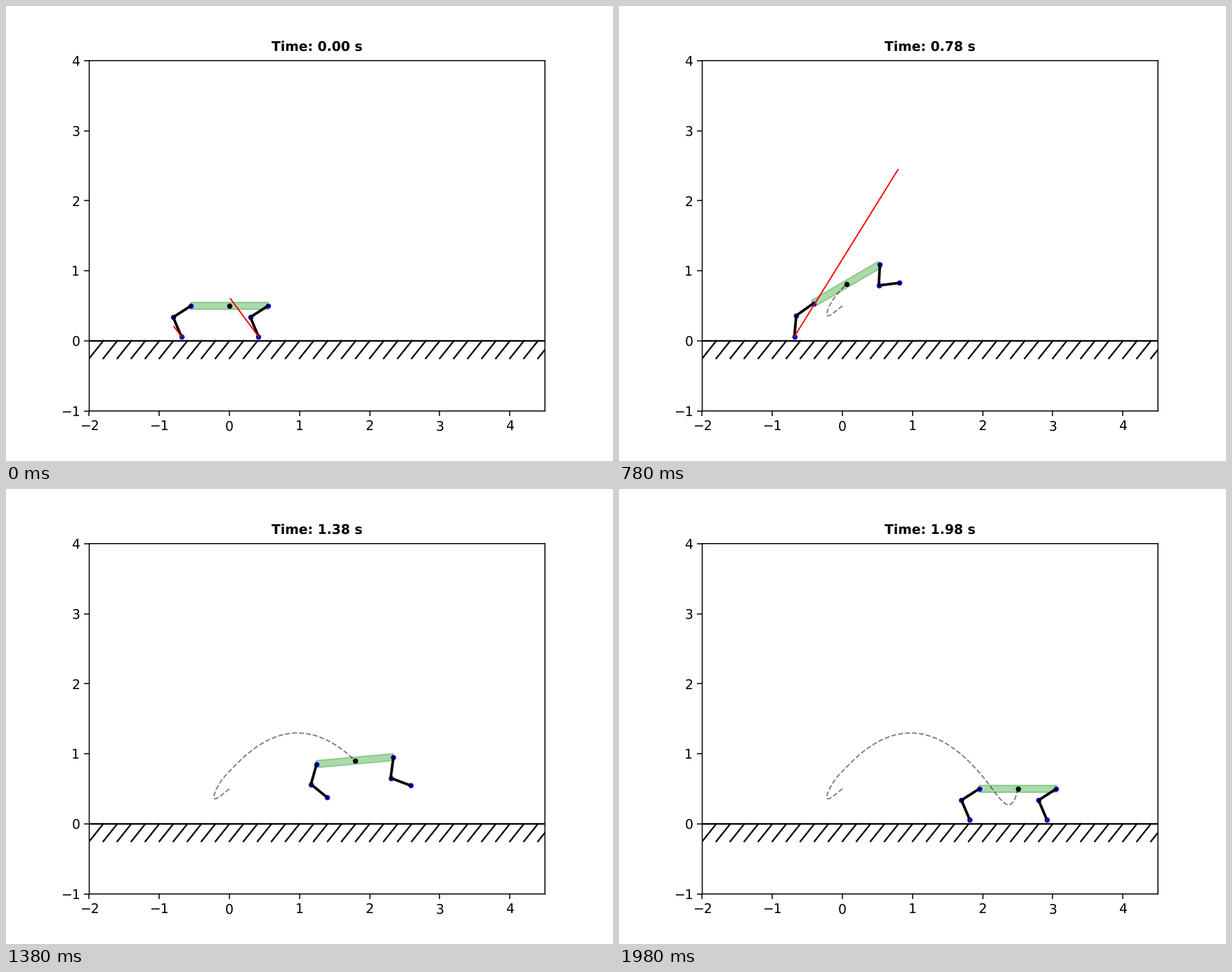
These frames come from a looping animation (864x648 px, 2 s). A matplotlib script:

```python
import numpy as np
import matplotlib.pyplot as plt
from matplotlib.animation import FuncAnimation
from matplotlib.patches import Polygon
from numpy.polynomial.polynomial import polyder, polyval

plt.rcParams.update({"path.snap": False, "text.hinting": "none"})

FRAMES, STEP = 100, 20          # 2 s loop
FRONT_OFF, HIND_OFF, LAND, REST = 0.6, 0.8, 1.5, 1.98
LINK, HALF, THICK = 0.3, 0.55, 0.1
G, WEIGHT = 9.81, 1.08          # weight in drawn force units
FALL = np.array([0, -G, 0])
JUMP = np.array([2.5, 0])


def blend(t0, t1, start, a0, end, a1):
    """Quintic from (pos, vel) and acceleration a0 to the same at t1."""
    T = t1 - t0
    (p0, v0), (p1, v1) = np.array(start, float), np.array(end, float)
    v0, v1 = v0 * T, v1 * T
    a0, a1 = np.array(a0) * T * T, np.array(a1) * T * T
    dp, dv, da = p1 - p0 - v0 - a0 / 2, v1 - v0 - a0, a1 - a0
    coef = np.array([p0, v0, a0 / 2,
                     10 * dp - 4 * dv + da / 2,
                     -15 * dp + 7 * dv - da,
                     6 * dp - 3 * dv + da / 2])

    def at(t):
        s = min((t - t0) / T, 1)
        return polyval(s, coef), polyval(s, polyder(coef, 2)) / T ** 2
    return at


# Each state is position and velocity of (x, y, pitch)
STAND = [(0, 0.5, 0), (0, 0, 0)]
REAR = [(-0.207, 0.447, 0.03), (0.6, 1.65, 3.6)]
LEAP = [(0.115, 0.868, 0.525), (2.89, 2.905, -0.75)]


def flight(t):
    p, v = np.array(LEAP)
    dt = t - HIND_OFF
    return p + v * dt + FALL * dt ** 2 / 2, FALL


TOUCH = [flight(LAND)[0], np.array(LEAP[1]) + FALL * (LAND - HIND_OFF)]
END = [(JUMP[0], 0.5, 0), (0, 0, 0)]

push = blend(0, FRONT_OFF, STAND, (-4.6, -3.6, -4), REAR, (13, 20, 48))
kick = blend(FRONT_OFF, HIND_OFF, REAR, (10, 5, 10), LEAP, (9, 14, -53))
settle = blend(LAND, REST, TOUCH, (-25.5, 45, 3), END, FALL)


def motion(t):
    """Body (x, y, pitch) and its acceleration."""
    for end, phase in ((FRONT_OFF, push), (HIND_OFF, kick), (LAND, flight)):
        if t < end:
            return phase(t)
    return settle(t)


def down(angle):
    """Link vector swung by angle from straight down."""
    return LINK * np.array([np.sin(angle), -np.cos(angle)])


def leg_from_angles(hip, thigh, bend):
    knee = hip + down(thigh)
    return np.array([hip, knee, knee + down(thigh + bend)])


def leg_to_foot(hip, foot):
    dx, dy = foot - hip
    half = np.arccos(min(np.hypot(dx, dy) / (2 * LINK), 1))
    return leg_from_angles(hip, np.arctan2(dx, -dy) - half, 2 * half)


class Leg:
    def __init__(self, side, off, swing):
        self.side, self.off, self.swing = side, off, np.array(swing)
        self.foot = leg_from_angles(np.array([side * HALF, 0.5]), -1, 1.4)[2]
        self.dots, = ax.plot([], [], "bo", ms=3, zorder=2)
        self.bar, = ax.plot([], [], "k", lw=2, zorder=2.1)
        self.arrow, = ax.plot([], [], "r", lw=1, zorder=2.3)

    def grounded(self, t):
        return t < self.off or t >= LAND

    def draw(self, t, body, load):
        pitch = body[2]
        hip = body[:2] + self.side * HALF * np.array([np.cos(pitch), np.sin(pitch)])
        if self.grounded(t):
            foot = self.foot + JUMP * (t >= LAND)
            points = leg_to_foot(hip, foot)
            self.arrow.set_data(*np.array([foot, foot + load]).T)
        else:
            s = (t - self.off) / (LAND - self.off)
            hip_angle, bend = self.swing + s * (np.array([-0.15, 1.26]) - self.swing)
            points = leg_from_angles(hip, hip_angle + pitch, bend)
            self.arrow.set_data([], [])
        self.dots.set_data(*points.T)
        self.bar.set_data(*points.T)


fig, ax = plt.subplots(figsize=(6.4, 4.8), dpi=135)
ax.set_aspect("equal")
ax.set_xlim(-2, 4.5)
ax.set_ylim(-1, 4)
title = ax.set_title("", fontsize=10, fontweight="bold", pad=7.6)

ax.plot([-2, 4.5], [0, 0], "k", lw=1.2)
for x in np.arange(-2, 4.5, 0.2):
    ax.plot([x, x + 0.2], [-0.25, 0], "k", lw=1.2)

torso = ax.add_patch(Polygon(np.zeros((4, 2)), color="tab:green", alpha=0.4, lw=1))
trail, = ax.plot([], [], "k--", lw=1, alpha=0.5)
center, = ax.plot([], [], "ko", ms=3, zorder=2.2)
hind = Leg(-1, HIND_OFF, (-1.39, 0.70))
front = Leg(1, FRONT_OFF, (-0.69, 1.87))

TIMES = np.arange(FRAMES) * STEP / 1000
PATH = np.array([motion(t)[0] for t in TIMES])


def draw(i):
    t = TIMES[i]
    body, acc = motion(t)
    pos, pitch = body[:2], body[2]

    # Ground reaction, shared by the feet that stand
    load = WEIGHT * (acc - FALL)[:2] / G
    share = 0.5 + 0.29 * max(0, 1 - t / 0.3) if front.grounded(t) else 0
    front.draw(t, body, share * load)
    hind.draw(t, body, (1 - share) * load)

    along = HALF * np.array([np.cos(pitch), np.sin(pitch)])
    across = THICK / 2 * np.array([-np.sin(pitch), np.cos(pitch)])
    torso.set_xy([pos - along + across, pos + along + across,
                  pos + along - across, pos - along - across])
    trail.set_data(*PATH[:i + 1, :2].T)
    center.set_data([pos[0]], [pos[1]])
    title.set_text(f"Time: {t:.2f} s")


anim = FuncAnimation(fig, draw, frames=FRAMES, interval=STEP,
                     repeat=True, repeat_delay=0, blit=False)
plt.show()
```
